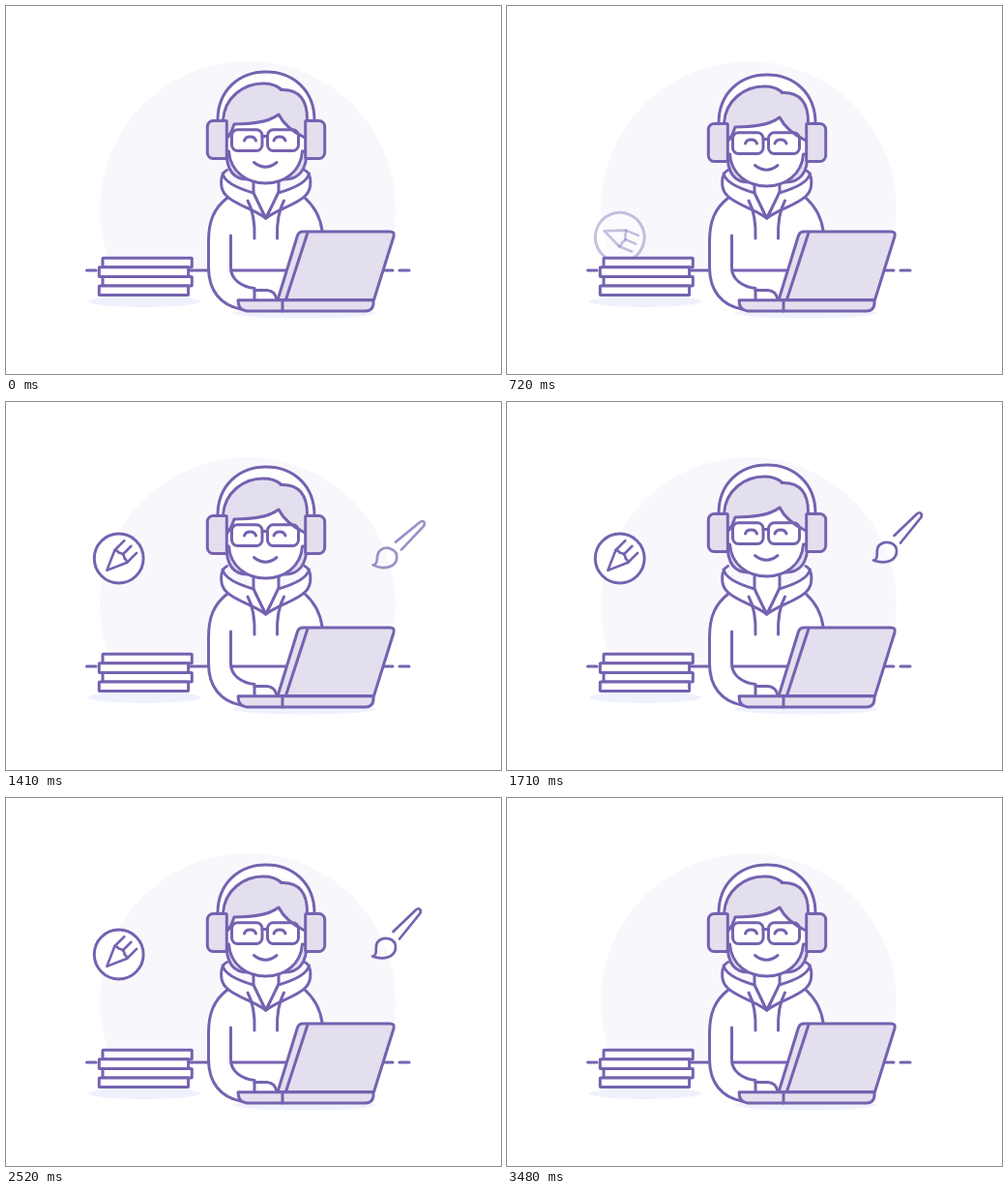
An HTML page with a canvas for the animation above (3600 ms loop, 512 by 380 pixels).

```html
<!DOCTYPE html>
<html lang="en">
<head>
<meta charset="utf-8">
<title>Designer at work</title>
<style>
html, body { margin: 0; width: 100%; height: 100%; overflow: hidden; background: #fff; }
canvas { display: block; width: 512px; height: 380px; }
</style>
</head>
<body>
<canvas id="stage" width="512" height="380"></canvas>
<script>
const canvas = document.getElementById('stage');
const ctx = canvas.getContext('2d');
const ratio = window.devicePixelRatio || 1;
canvas.width = 512 * ratio;
canvas.height = 380 * ratio;

const LOOP = 3600, STEP = 30;
const INK = '#7562b0', LILAC = '#e3dfee', TINT = '#f8f7fc', SHADOW = '#eff2fd', WHITE = '#fff';

const clamp = v => Math.max(0, Math.min(1, v));
const span = (t, from, to) => clamp((t - from) / (to - from));

function shape(d, fill, line = true) {
  const p = new Path2D(d);
  if (fill) { ctx.fillStyle = fill; ctx.fill(p); }
  if (line) ctx.stroke(p);
}

function box(x, y, w, h, radii, fill) {
  const p = new Path2D();
  p.roundRect(x, y, w, h, radii);
  if (fill) { ctx.fillStyle = fill; ctx.fill(p); }
  ctx.stroke(p);
}

function oval(x, y, rx, ry, fill) {
  ctx.beginPath();
  ctx.ellipse(x, y, rx, ry, 0, 0, Math.PI * 2);
  ctx.fillStyle = fill;
  ctx.fill();
}

function group(draw, { x = 0, y = 0, turn = 0, alpha = 1 }) {
  if (alpha <= 0) return;
  ctx.save();
  ctx.globalAlpha = alpha;
  ctx.translate(x, y);
  ctx.rotate(turn);
  draw();
  ctx.restore();
}

// Whole-pixel nodding: a steady drift between turning points.
function nod(t) {
  const pace = 195;
  if (t < 622) return Math.round(0.5 + (t - 119) / pace);
  if (t < 1815) return Math.round(-2.5 + (1709 - t) / pace);
  if (t < 3040) return Math.round(-2.5 + (t - 1919) / pace);
  return t < 3180 ? 3 : t < 3450 ? 2 : 1;
}

function backdrop() {
  ctx.save();
  ctx.beginPath();
  ctx.rect(0, 0, 512, 273);
  ctx.clip();
  oval(250, 210, 153, 153, TINT);
  ctx.restore();
  oval(143, 305, 58, 6, SHADOW);
  oval(309, 317, 74, 5.5, SHADOW);
  shape('M83.5 273H93M190 273H210M391 273H400M407 273H417');
}

function books() {
  for (let i = 0; i < 4; i++) box(i % 2 ? 96.3 : 100, 260.2 + i * 9.6, 92.3, 9.6, 0.5, WHITE);
}

function body() {
  shape('M229 198C215 209 209.5 222 209.5 243V270C209.5 294 222 309 243 313H300L327 232' +
    'C325 217 319 207 309 198Z', WHITE, false);
  shape('M229 198C215 209 209.5 222 209.5 243V270C209.5 294 222 309 243 313M309 198C319 207 325 217 327 232');
  shape('M233 273H292');
  shape('M232.5 237V270C232.5 282 243 290 257 291.5V303', null);
  shape('M257 293.5H270C276 294 279 298 280 303');
  shape('M256 180V195L268.5 219L282 195V180', WHITE);
}

function hoodSide() {
  shape('M228.500 169.500C221 173 220.500 189 228 196C238 206 256 209 268.500 219' +
    'L256 193C242 189 226 182 224 173', WHITE);
}

function hood() {
  hoodSide();
  ctx.save();
  ctx.translate(537.5, 0);
  ctx.scale(-1, 1);
  hoodSide();
  ctx.restore();
  shape('M250 201C256 212 257.500 225 257 240M287.500 201C281.500 212 280 225 280.500 240');
}

function laptop() {
  shape('M281 303.500L301.500 237Q303 233 307 233H397Q402.500 233 401 238L380.500 303.500Z', LILAC);
  shape('M289.500 303L312 234');
  shape('M240 303.800H380V308Q379 315 372 315H249Q240 314 240 303.800Z', LILAC);
  shape('M286 304V315');
}

function backHair() {
  shape('M228 150C228 170 236 179 250 179H288C302 179 311 170 311 150Z', LILAC);
}

function head() {
  // headband
  shape('M219 118C219 87 241 68 269 68C297 68 319 87 319 118L311 120H227Z', WHITE, false);
  // face
  shape('M230 120V150C232 171 249 183 268.500 183C288 183 305 171 308 150V120Z', WHITE, false);
  shape('M229 150H230.500C232 171 249 183 268.500 183C288 183 305 171 306.500 150H309');
  // hair
  shape('M227 120C226 94 246 80 266 80Q277 80 284 86C304 86 312 98 311 116V137' +
    'C297 130 287 122 282 112C270 121 252 122 236 122L230 136H228Z', LILAC, false);
  shape('M219 118C219 87 241 68 269 68C297 68 319 87 319 118');
  shape('M224.500 118C226 94 246 80 266 80Q277 80 284 85.500');
  shape('M284 86.500C303 85.500 312 97 311.500 118');
  shape('M229 136C233 132 234 127 236 122C252 122 270 121 282 112C287 122 297 130 309 136');
  // headphones
  box(208.300, 118.500, 20, 39, [6, 1, 1, 6], LILAC);
  box(309.700, 118.500, 20, 39, [1, 6, 6, 1], LILAC);
  // glasses, eyes, smile
  box(233.500, 127.700, 31.500, 21.800, 6);
  box(270.500, 127.700, 32, 21.800, 6);
  shape('M265 134.500H270.500M230 133L233.500 132');
  shape('M246.500 139C248 133.500 257 133.500 258.500 139M277 139C278.500 133.500 287.500 133.500 289 139');
  shape('M256.500 161.500Q268.500 171 280 161.500');
}

// Drawn with the tip along +x.
function pencil() {
  ctx.beginPath();
  ctx.arc(0, 0, 25.4, 0, Math.PI * 2);
  ctx.fillStyle = WHITE;
  ctx.fill();
  ctx.stroke();
  ctx.lineWidth = 2.6;
  shape('M17.500 0L-3 -9Q-5 -6 -4 -4.500Q-8 0 -4 4.500Q-5 6 -3 9Z');
  shape('M-3 -9H-17M-6 0H-18M-3 9H-17');
}

// Drawn around the bristles.
function brush() {
  ctx.lineWidth = 2.7;
  shape('M-13 8.500C-6 7 -12 -2 -7 -7C-1 -13 11 -10 11 -1C11 9 -1 13 -13 8.500Z');
  shape('M8.500 -17L32 -39.500Q35 -42 36.500 -39.500Q37.500 -38 36 -35.500L15 -9.500');
}

function drawPencil(t, fade) {
  const left = Math.pow(1 - span(t, 600, 1000), 1.5);
  const turn = Math.PI * (0.75 + 2 * span(t, 610, 1200));
  group(pencil, { x: 116.7, y: 161.5 + 132 * left, turn, alpha: span(t, 640, 840) * fade });
}

function drawBrush(t, fade) {
  const left = Math.pow(1 - span(t, 1260, 1710), 3);
  group(brush, {
    x: 392 + 4 * left,
    y: 155 + 20 * left,
    turn: 15 * left * Math.PI / 180,
    alpha: span(t, 1270, 1470) * fade
  });
}

function render(t) {
  ctx.setTransform(ratio, 0, 0, ratio, 0, 0);
  ctx.fillStyle = WHITE;
  ctx.fillRect(0, 0, 512, 380);
  ctx.strokeStyle = INK;
  ctx.lineWidth = 3;
  ctx.lineCap = ctx.lineJoin = 'round';

  const fade = 1 - span(t, 2760, 3090);
  const bob = { y: nod(t) };
  backdrop();
  drawPencil(t, fade);
  books();
  group(backHair, bob);
  body();
  hood();
  group(head, bob);
  laptop();
  drawBrush(t, fade);
}

const start = performance.now();
function tick() {
  const t = (performance.now() - start) % LOOP;
  render(Math.floor(t / STEP) * STEP);
  requestAnimationFrame(tick);
}
tick();
</script>
</body>
</html>
```
